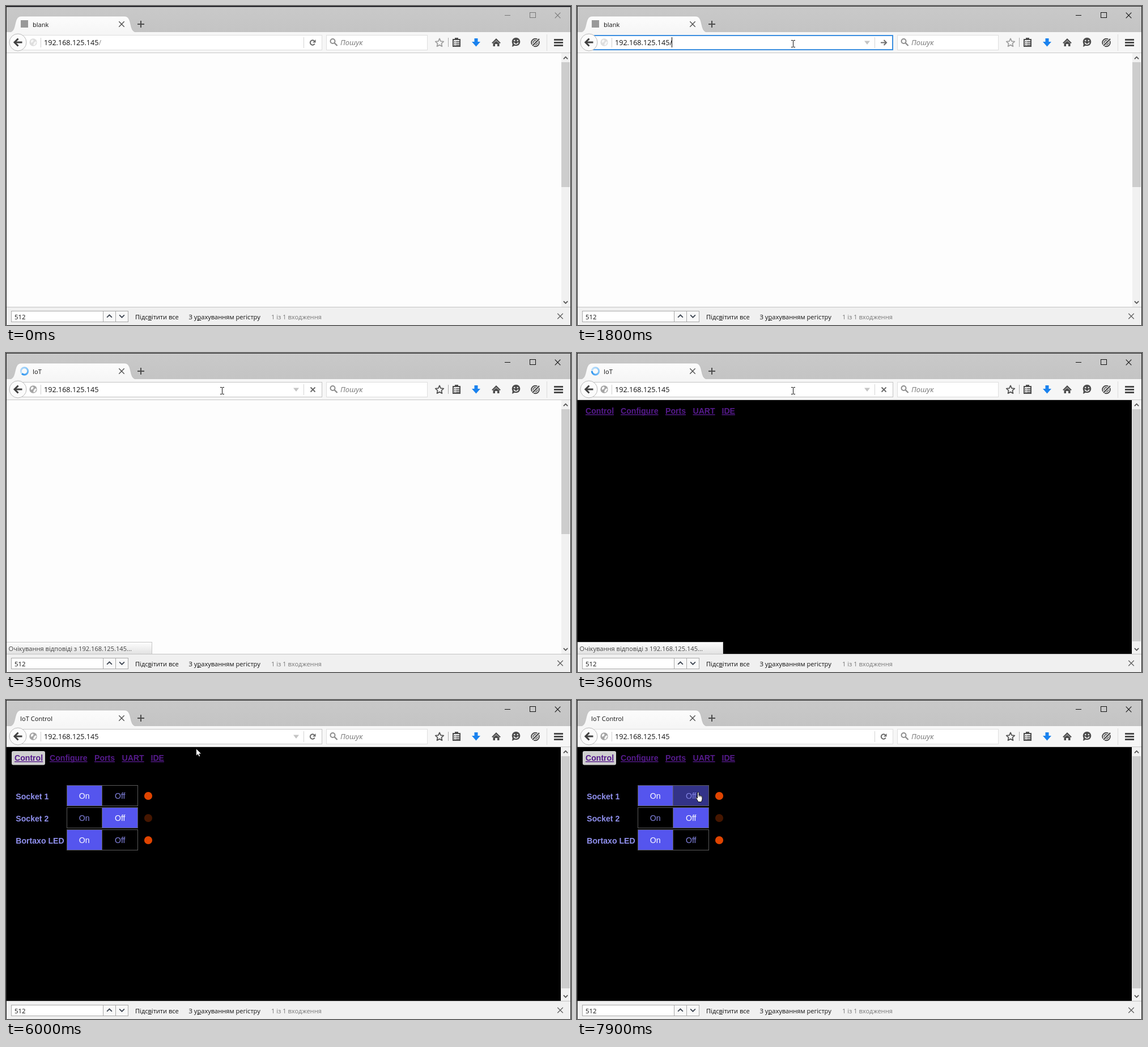
Animation of 997 by 562 pixels, one loop 8000 ms. Source, as an HTML page with a canvas:

```html
<!DOCTYPE html>
<html lang="uk">
<head>
<meta charset="utf-8">
<title>IoT Control</title>
<style>
html, body { margin: 0; width: 100%; height: 100%; overflow: hidden; background: #fff; }
canvas { display: block; width: 100vw; height: 100vh; }
</style>
</head>
<body>
<canvas id="stage" width="997" height="562"></canvas>
<script>
const LOOP = 8000;
const c = document.getElementById('stage').getContext('2d');
const UI = '"Open Sans", "Noto Sans", sans-serif';
const ARIAL = '"Liberation Sans", Arial, sans-serif';
const ICON = '#4c4c4c';

// Pointer positions, each held until the next: time, x, y, shape
const POINTER = [
  [100, 793, 45, arrow], [600, 640, 65, beam], [700, 504, 85, arrow], [800, 469, 85, arrow],
  [1000, 430, 84, arrow], [1100, 399, 84, arrow], [1200, 386, 72, beam], [1300, 383, 68, beam],
  [1400, 381, 66, beam], [6000, 335, 85, arrow], [6500, 318, 96, arrow], [6600, 288, 116, arrow],
  [6700, 262, 129, arrow], [6800, 251, 132, arrow], [7500, 245, 138, arrow], [7600, 236, 146, arrow],
  [7700, 222, 154, hand], [7800, 213, 160, hand], [7900, 209, 162, hand]
];

function rect(x, y, w, h, fill) {
  c.fillStyle = fill;
  c.fillRect(x, y, w, h);
}

function frame(x, y, w, h, color, width = 1) {
  c.strokeStyle = color;
  c.lineWidth = width;
  c.strokeRect(x + width / 2, y + width / 2, w - width, h - width);
}

function text(s, x, y, color, font, align = 'left') {
  c.font = font;
  c.fillStyle = color;
  c.textAlign = align;
  c.fillText(s, x, y);
  return c.measureText(s).width;
}

function trace(points, close) {
  c.beginPath();
  for (let i = 0; i < points.length; i += 2) c.lineTo(points[i], points[i + 1]);
  if (close) c.closePath();
}

function line(points, color, width = 1) {
  trace(points);
  c.strokeStyle = color;
  c.lineWidth = width;
  c.stroke();
}

function poly(points, color) {
  trace(points, true);
  c.fillStyle = color;
  c.fill();
}

function disc(x, y, r, color) {
  c.beginPath();
  c.arc(x, y, r, 0, 7);
  c.fillStyle = color;
  c.fill();
}

function arc(x, y, r, from, to, color, width) {
  c.beginPath();
  c.arc(x, y, r, from, to);
  c.strokeStyle = color;
  c.lineWidth = width;
  c.stroke();
}

function cross(x, y, r, color, width) {
  line([x - r, y - r, x + r, y + r], color, width);
  line([x - r, y + r, x + r, y - r], color, width);
}

function chevron(x, y, dir, color, r = 4) {
  line([x - r, y + dir * r / 2, x, y - dir * r / 2, x + r, y + dir * r / 2], color, 1.8);
}

function gradient(y0, y1, top, bottom) {
  const g = c.createLinearGradient(0, y0, 0, y1);
  g.addColorStop(0, top);
  g.addColorStop(1, bottom);
  return g;
}

function arrow(x, y) {
  c.save();
  c.translate(x + 0.5, y + 0.5);
  poly([0, 0, 0, 13, 3, 10.3, 5, 14.5, 7.3, 13.5, 5.4, 9.4, 9.5, 9.4], '#fff');
  c.strokeStyle = '#000';
  c.lineWidth = 0.9;
  c.stroke();
  c.restore();
}

function beam(x, y) {
  rect(x, y - 5, 1, 11, '#111');
  for (const dy of [-6, 6]) {
    rect(x - 3, y + dy, 3, 1, '#111');
    rect(x + 1, y + dy, 3, 1, '#111');
  }
}

function hand(x, y) {
  c.save();
  c.translate(x, y);
  trace([3.5, 1, 5, 0.5, 6, 1.5, 6, 6, 8, 6, 10.5, 7, 12, 8.5, 12, 13, 10.5, 17.5,
    5, 17.5, 3.5, 14.5, 0.8, 10.5, 1.5, 9.3, 3.5, 11], true);
  c.lineJoin = 'round';
  c.fillStyle = '#fff';
  c.strokeStyle = '#111';
  c.lineWidth = 1;
  c.fill();
  c.stroke();
  line([6, 6, 6, 9], '#333', 0.8);
  line([8.2, 6.5, 8.2, 9], '#333', 0.8);
  line([10.3, 7.5, 10.3, 9.5], '#333', 0.8);
  c.restore();
}

function drawTitleBar(t) {
  const active = t >= 1400;
  rect(0, 0, 997, 46, gradient(0, 46, '#c9c9c9', '#c4c4c4'));
  const mark = active ? '#111' : '#777';
  rect(880, 16, 10, 1, mark);
  frame(924, 11, 11, 10, mark);
  cross(973.5, 16.5, 4.8, mark, 1.1);

  c.beginPath();
  c.moveTo(6, 46);
  c.bezierCurveTo(20, 46, 12, 18, 27, 18);
  c.lineTo(209, 18);
  c.bezierCurveTo(224, 18, 216, 46, 230, 46);
  c.fillStyle = gradient(18, 46, '#fcfcfc', '#f6f6f6');
  c.fill();
  c.strokeStyle = '#b4b4b4';
  c.lineWidth = 0.6;
  c.stroke();
  cross(204, 32, 4.7, '#505050', 1.4);
  rect(232, 31, 12, 2, '#4c4c4c');
  rect(237, 26, 2, 12, '#4c4c4c');

  const font = '11.1px ' + UI;
  if (t < 3000) {
    rect(26, 25, 13, 13, '#999');
    text('blank', 47, 36.5, '#111', font);
  } else if (t < 4500) {
    drawSpinner(t);
    text('IoT', 47, 36.5, '#111', font);
  } else {
    text('IoT Control', 25, 36.5, '#111', font);
  }
}

function drawSpinner(t) {
  const turn = Math.floor(t / 100) / 8 * Math.PI * 2;
  const g = c.createConicGradient(turn, 32.5, 32);
  g.addColorStop(0, '#c3e2fb');
  g.addColorStop(0.5, '#8cc8f8');
  g.addColorStop(1, '#2590ee');
  arc(32.5, 32, 6.2, 0, 7, g, 3);
}

function drawGlobe(color) {
  disc(48, 64, 6.7, color);
  poly([44, 61, 47, 59, 49, 61, 47, 64, 44, 65], '#f6f6f6');
  poly([49, 65, 52, 62, 54, 64, 51, 69, 48, 69], '#f6f6f6');
}

function drawAddress(t) {
  const focused = t >= 1800 && t < 3000;
  const hovered = t >= 1200 && t < 6500;
  rect(28, 51, 530, 27, '#fff');
  if (focused) frame(22, 51, 536, 27, '#3c8fe0', 2);
  else frame(22, 51, 536, 27, hovered ? '#c4c4c4' : '#dedede');

  disc(21, 64, 15.2, '#fbfbfb');
  arc(21, 64, 15, 0, 7, '#b8b8b8', 1);
  line([21.5, 57.5, 15, 64, 21.5, 70.5], '#404040', 3);
  line([15.5, 64, 28.5, 64], '#404040', 3);

  drawGlobe(t < 3000 ? '#dedede' : '#a4a4a4');
  rect(61, 56, 1, 17, '#cfcfcf');
  const font = '12.6px ' + UI;
  const end = 67 + text('192.168.125.145', 67, 69, '#111', font);
  if (t < 3000) text('/', end, 69, focused ? '#111' : '#888', font);
  if (focused && t < 2500) rect(167, 55, 1, 18, '#000');

  if (hovered) poly([507, 61.5, 517, 61.5, 512, 68], '#c4c4c4');
  rect(525, 55, 1, 19, '#d4d4d4');
  if (focused) {
    line([536, 64.5, 545, 64.5], '#6c6c6c', 2);
    line([541.5, 60, 546, 64.5, 541.5, 69], '#6c6c6c', 2);
  } else if (t >= 3000 && t < 4500) {
    cross(541.5, 64.5, 4, '#6a6a6a', 2);
  } else {
    arc(541, 64.5, 4.2, 0.5, 5.5, '#6a6a6a', 2);
    poly([546.5, 59, 546.5, 64.5, 541, 64.5], '#6a6a6a');
  }
}

function drawStar(color) {
  const points = [];
  for (let i = 0; i < 10; i++) {
    const a = i * Math.PI / 5 - Math.PI / 2, r = i % 2 ? 3.6 : 7.6;
    points.push(765 + r * Math.cos(a), 65 + r * Math.sin(a));
  }
  trace(points, true);
  c.lineJoin = 'round';
  c.strokeStyle = color;
  c.lineWidth = 1.8;
  c.stroke();
  c.lineJoin = 'miter';
}

function drawTools(t) {
  rect(565, 51, 179, 27, '#fff');
  frame(565, 51, 179, 27, '#dedede');
  arc(576.5, 62, 4, 0, 7, '#8c8c8c', 2);
  line([579.5, 65, 584.5, 70], '#8c8c8c', 2.4);
  text('Пошук', 590, 69, '#777', 'italic 12.9px ' + UI);

  drawStar(t < 3000 ? '#a0a0a0' : '#555');
  rect(780, 56, 1, 16, '#ababab');

  frame(788, 58, 14, 14, ICON, 2);
  rect(792, 56, 6, 4, ICON);
  for (const y of [62, 65, 68]) {
    rect(791, y, 2, 1.5, ICON);
    rect(794, y, 6, 1.5, ICON);
  }

  poly([826.5, 57, 832.5, 57, 832.5, 63, 837, 63, 829.5, 71.5, 822, 63, 826.5, 63], '#1a82ee');

  poly([865, 57, 873, 65, 871, 66, 865, 60.5, 859, 66, 857, 65], ICON);
  poly([865, 61.5, 870.5, 66, 870.5, 71, 867, 71, 867, 67, 863, 67, 863, 71, 859.5, 71, 859.5, 66], ICON);

  disc(900, 63, 7.3, ICON);
  poly([894, 66, 893, 72, 899, 69], ICON);
  disc(897.3, 61, 1.2, '#f6f6f6');
  disc(902.7, 61, 1.2, '#f6f6f6');
  arc(900, 63.5, 3.8, 0.2, 2.94, '#f6f6f6', 1.6);

  arc(934, 64.5, 6.8, 0, 7, ICON, 2);
  arc(934, 64.5, 3.6, 0, 7, ICON, 1.6);
  line([928, 71, 941, 58], '#f6f6f6', 4.5);
  line([929, 70, 941, 58], ICON, 2.4);

  rect(954, 50, 1, 29, '#dcdcdc');
  for (const y of [58, 63, 68]) rect(967, y, 16, 3, ICON);
}

function drawScrollbar(loaded) {
  rect(loaded ? 979 : 980, 83, 17, 447, '#f1f1f1');
  rect(980, 99, 15, loaded ? 409 : 220, '#cdcdcd');
  chevron(987.5, 91.5, 1, '#505050', 3.6);
  chevron(987.5, 522, -1, '#505050', 3.6);
}

function drawMenu(selected) {
  if (selected) {
    c.beginPath();
    c.roundRect(10, 90, 59, 24.5, 3);
    c.fillStyle = '#cfcfcf';
    c.fill();
  }
  const links = { Control: 15, Configure: 77, Ports: 156, UART: 204.5, IDE: 255.5 };
  for (const name in links) {
    const w = text(name, links[name], 107, '#551a8b', 'bold 14.1px ' + ARIAL);
    rect(links[name], 108, w, 1.4, '#551a8b');
  }
}

function drawButton(label, x, y, w, on, hover) {
  const fill = on ? '#5555ee' : hover ? '#333388' : '#000';
  rect(x, y, w, 37, fill);
  text(label, x + w / 2, y + 24, on ? '#fff' : '#8686e6', '14.1px ' + ARIAL, 'center');
}

function drawRow(name, y, on, hover) {
  text(name, 17.3, y + 24.5, '#9090ee', 'bold 14.1px ' + ARIAL);
  drawButton('On', 107, y, 62.5, on);
  drawButton('Off', 169.5, y, 63.5, !on, hover);
  frame(107, y, 126, 37, '#5a5a5a');
  rect(169, y, 1, 37, '#5a5a5a');
  disc(251, y + 19, 7.1, on ? '#e04400' : '#451600');
}

function drawPage(t) {
  const loaded = t >= 3600, ready = t >= 4300;
  rect(1, 83, 980, 447, loaded ? '#000' : '#fdfdfd');
  drawScrollbar(loaded);
  if (loaded) drawMenu(ready);
  if (ready) {
    drawRow('Socket 1', 150, true, t >= 7700);
    drawRow('Socket 2', 189, false);
    drawRow('Bortaxo LED', 228, true);
  }
  if (t >= 3000 && t < 4500) {
    rect(1, 509, 257, 21, '#c6c6c6');
    rect(1, 510, 256, 20, gradient(510, 530, '#fdfdfd', '#e2e2e2'));
    text('Очікування відповіді з 192.168.125.145...', 4.5, 525, '#444', '11.1px ' + UI);
  }
}

// Label with the access key underlined
function keyLabel(s, key, x) {
  const w = text(s, x, 552, '#111', '11.1px ' + UI);
  const from = c.measureText(s.slice(0, key)).width;
  rect(x + from, 553, c.measureText(s[key]).width, 1, '#111');
  return w;
}

function drawFindBar() {
  rect(0, 530, 997, 32, '#f0f0f0');
  rect(0, 530, 997, 1, '#c2c2c2');
  rect(9, 537, 207, 20, '#fff');
  rect(171, 537, 45, 20, '#f8f8f8');
  frame(9, 537, 207, 20, '#a8a8a8');
  rect(171, 537, 1, 20, '#a8a8a8');
  rect(193, 537, 1, 20, '#a8a8a8');
  text('512', 15, 552, '#111', '11.4px ' + UI);
  chevron(182.5, 546.5, 1, '#3c4450', 4.4);
  chevron(204.5, 546.5, -1, '#3c4450', 4.4);
  keyLabel('Підсвітити все', 4, 228);
  keyLabel('З урахуванням регістру', 3, 322.5);
  text('1 із 1 входження', 468, 552, '#777', '11.1px ' + UI);
  cross(978, 546.5, 4.8, '#606060', 1.3);
}

function drawEdges(t) {
  const active = t >= 1400;
  rect(0, 0, 997, active ? 1 : 1.6, active ? '#2a2a2a' : '#0a0a10');
  rect(0, 0, 1, 562, '#222');
  rect(996, 0, 1, 562, '#222');
}

function draw(t) {
  drawTitleBar(t);
  rect(0, 46, 997, 37, '#f6f6f6');
  rect(0, 82, 997, 1, '#c8c8c8');
  drawAddress(t);
  drawTools(t);
  drawPage(t);
  drawFindBar();
  drawEdges(t);
  const spot = POINTER.filter(p => p[0] <= t).pop();
  if (spot) spot[3](spot[1], spot[2]);
}

const start = performance.now();
function tick() {
  draw((performance.now() - start) % LOOP);
  requestAnimationFrame(tick);
}
tick();
</script>
</body>
</html>
```
